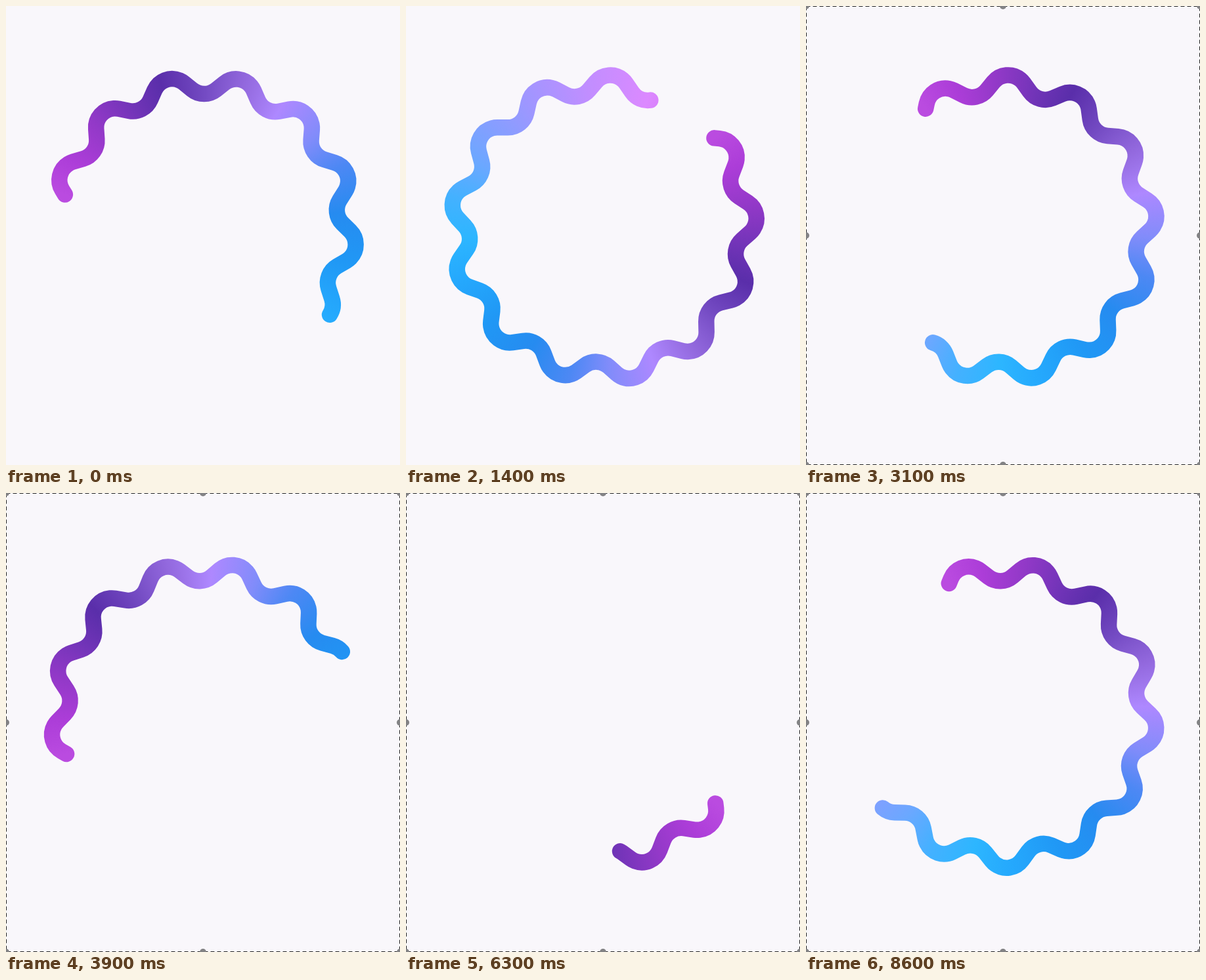
Animation, 600 px wide and 700 px high, one loop 8.7 s. Source, as an HTML page with a canvas:

```html
<!DOCTYPE html>
<html lang="en">
<head>
<meta charset="utf-8">
<title>Wavy ring</title>
<style>
  html, body { margin: 0; width: 100%; height: 100%; overflow: hidden; background: #f9f7fb; }
  canvas { display: block; width: 600px; height: 700px; }
</style>
</head>
<body>
<canvas id="stage" width="600" height="700"></canvas>
<script>
const ctx = document.getElementById('stage').getContext('2d');
const WIDTH = 600, HEIGHT = 700;
const LOOP = 8700, STEP = 100;
const TURN = 3960;            // ms for one revolution, during which the ring also fills
const FRAME_FROM = 3000;      // when the selection frame appears
const CENTER = [301, 338.5], STROKE = 24.5;
const PEAK = 233.2, VALLEY = 204.4, BEND = 29, WAVES = 13;
const RAD = Math.PI / 180;

// [time, progress in ms]: the ring fills, unwinds and fills again
const PROGRESS = [[0, 2208], [1752, TURN], [1824, TURN], [5784, 0], [5799, 0], [8700, 2901]];

// [degrees from the tail, colour]
const COLORS = [
  [0, '#ba4be0'], [14, '#ac3dd8'], [30, '#9339c8'], [46, '#7234b8'], [60, '#5a2eaa'],
  [77, '#744bc3'], [92, '#9268dd'], [109, '#ae88ff'], [127, '#818cfa'], [142, '#4d88f4'],
  [160, '#268bf0'], [180, '#2098f5'], [200, '#25a9fd'], [215, '#2db6ff'], [231, '#44b1ff'],
  [246, '#6aa8ff'], [262, '#869eff'], [283, '#a694ff'], [302, '#c08eff'], [328, '#dc89ff'],
  [352, '#cf66ee']
];

const polar = (radius, angle) => [radius * Math.cos(angle), radius * Math.sin(angle)];

// Alternating arcs of equal radius joined by their crossing tangents
function buildWave() {
  const half = Math.PI / WAVES;
  const hill = PEAK - BEND, dip = VALLEY + BEND;
  const [vx, vy] = polar(dip, half);
  const dx = vx - hill, gap = Math.hypot(dx, vy);
  const spread = Math.atan2(vy, dx) - Math.acos(2 * BEND / gap);
  const middle = [(vx + hill) / 2, vy / 2];
  const first = Math.atan2(middle[1], middle[0]);

  const path = new Path2D();
  path.moveTo(Math.hypot(...middle), 0);
  for (let i = 0; i < WAVES; i++) {
    const a = first + 2 * half * i;
    path.arc(...polar(hill, a), BEND, a - spread, a + spread);
    path.arc(...polar(dip, a + half), BEND,
      a + spread + Math.PI, a + 2 * half - spread + Math.PI, true);
  }
  path.closePath();

  const straight = Math.sqrt(gap * gap - 4 * BEND * BEND);
  const length = 2 * WAVES * (BEND * (2 * spread - half) + straight);
  return { path, length };
}

// The seam lies just before the tail so that its round cap keeps one colour
function buildGradient() {
  const lead = 4;
  const gradient = ctx.createConicGradient(-lead * RAD, 0, 0);
  gradient.addColorStop(0, COLORS[0][1]);
  for (const [angle, color] of COLORS) gradient.addColorStop((angle + lead) / 360, color);
  return gradient;
}

function progressAt(time) {
  const i = PROGRESS.findIndex(([end]) => time < end);
  const [t0, p0] = PROGRESS[i - 1], [t1, p1] = PROGRESS[i];
  return p0 + (p1 - p0) * (time - t0) / (t1 - t0);
}

const wave = buildWave();
const gradient = buildGradient();

function drawRing(time) {
  const part = progressAt(time) / TURN;
  ctx.save();
  ctx.translate(...CENTER);
  ctx.rotate((82.85 - 90 + 360 * part) * RAD);
  ctx.lineWidth = STROKE;
  ctx.lineCap = ctx.lineJoin = 'round';
  ctx.strokeStyle = gradient;
  if (part < 1) ctx.setLineDash([wave.length * part, wave.length * 2]);
  ctx.stroke(wave.path);
  ctx.restore();
}

function drawSelection() {
  ctx.save();
  ctx.lineWidth = 1;
  ctx.strokeStyle = '#fff';
  ctx.strokeRect(0.5, 0.5, WIDTH - 1, HEIGHT - 1);
  ctx.strokeStyle = '#222';
  ctx.setLineDash([6, 4]);
  ctx.strokeRect(0.5, 0.5, WIDTH - 1, HEIGHT - 1);
  ctx.fillStyle = '#828284';
  for (const x of [0, WIDTH / 2, WIDTH]) {
    for (const y of [0, HEIGHT / 2, HEIGHT]) {
      if (x === WIDTH / 2 && y === HEIGHT / 2) continue;
      ctx.beginPath();
      ctx.arc(x, y, 5, 0, 2 * Math.PI);
      ctx.fill();
    }
  }
  ctx.restore();
}

function draw(now) {
  const time = Math.floor((now % LOOP) / STEP) * STEP;
  ctx.fillStyle = '#f9f7fb';
  ctx.fillRect(0, 0, WIDTH, HEIGHT);
  drawRing(time);
  if (time >= FRAME_FROM) drawSelection();
}

let start;
function tick(now) {
  start ??= now;
  draw(now - start);
  requestAnimationFrame(tick);
}
draw(0);
requestAnimationFrame(tick);
</script>
</body>
</html>
```
